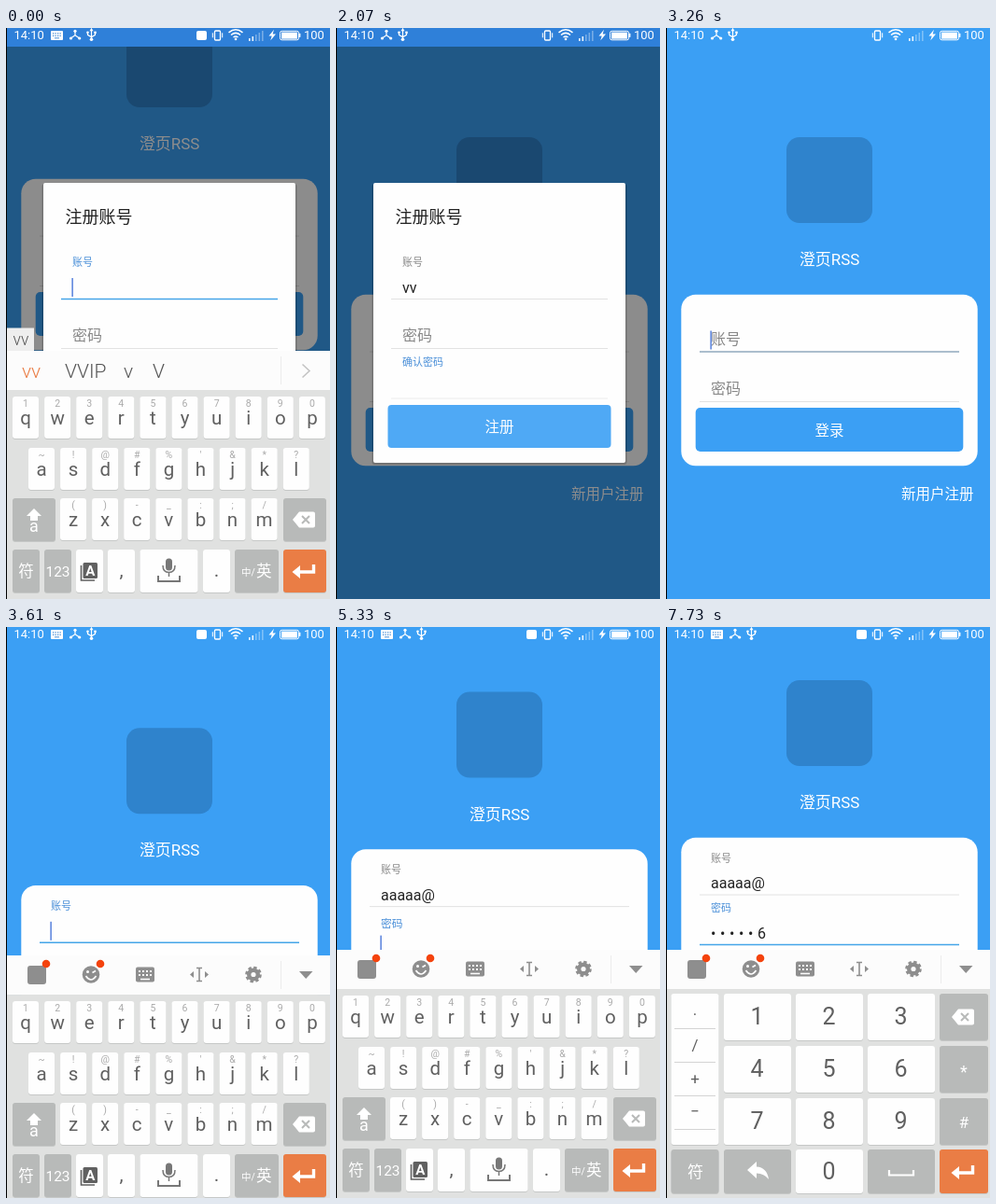
Recreate the animation shown at these times as an HTML page. Size 347 px wide and 612 px high, loop 8000 ms.

```html
<!DOCTYPE html>
<html lang="zh-CN">
<head>
<meta charset="utf-8">
<title>登录与注册</title>
<style>
html, body { margin: 0; width: 100%; height: 100%; overflow: hidden; background: #3b9ff4; }
svg { display: block; width: 100%; height: 100%; }
text { font-family: Roboto, 'Noto Sans CJK SC', 'Noto Sans CJK', sans-serif; white-space: pre; }
</style>
</head>
<body>
<svg id="stage" viewBox="0 0 347 612"></svg>
<script>
const LOOP = 8000;
const BLUE = '#3b9ff4', GREY = '#b8bab9', INK = '#606060', ORANGE = '#ea7d45', ICON = '#8e8e8e';

// Markup helpers
const rect = (x, y, w, h, fill, r = 0, more = '') =>
  `<rect x="${x}" y="${y}" width="${w}" height="${h}" rx="${r}" fill="${fill}" ${more}/>`;
const text = (x, y, s, size, fill, more = '') =>
  `<text x="${x}" y="${y}" font-size="${size}" fill="${fill}" ${more}>${s}</text>`;
const mid = (x, y, s, size, fill, more = '') => text(x, y, s, size, fill, 'text-anchor="middle" ' + more);
const dot = (x, y, r, fill) => `<circle cx="${x}" cy="${y}" r="${r}" fill="${fill}"/>`;
const line = (d, stroke, w = 1, more = '') =>
  `<path d="${d}" fill="none" stroke="${stroke}" stroke-width="${w}" ${more}/>`;
const shape = (d, fill) => `<path d="${d}" fill="${fill}"/>`;
const group = (id, body, more = '') => `<g id="${id}" ${more}>${body}</g>`;
const at = (x, y, body) => `<g transform="translate(${x} ${y})">${body}</g>`;

const key = (x, y, w, h, fill = '#fefefe', id = '') =>
  rect(x, y + 1, w, h, '#c6c8c7', 3) + rect(x, y, w, h, fill, 3, id && `id="${id}"`);
const backspace = (x, y) => at(x, y,
  shape('M-12 0L-5 -8.5H10Q12 -8.5 12 -6.5V6.5Q12 8.5 10 8.5H-5Z', '#fff') + line('M-2 -4L6 4M6 -4L-2 4', GREY, 2));
const enter = (x, y) => at(x, y,
  line('M10.5 -7V1H-6', '#fff', 3.4) + shape('M-12.5 1L-4 -6V8Z', '#fff'));

function letterKeys() {
  const rows = [
    [21, 395, 'qwertyuiop', '1234567890'],
    [38, 450, 'asdfghjkl', "~!@#%'&*?"],
    [72, 504, 'zxcvbnm', '()-_:;/']
  ];
  let out = '';
  for (const [x0, y, letters, marks] of rows) {
    [...letters].forEach((c, i) => {
      const x = x0 + i * 34.1;
      out += key(x - 14, y, 28, 45, '#fefefe', 'key-' + c) +
        mid(x, y + 11, marks[i].replace('&', '&amp;'), 10.5, '#aaa') + mid(x, y + 30, c, 20.5, INK);
    });
  }
  out += key(7, 504, 46, 46, GREY) + shape('M30 515L38 523H34V528H26V523H22Z', '#fff') + mid(30, 539.5, 'a', 18, '#fff') +
    key(297, 504, 46, 46, GREY) + backspace(319, 527);
  const y = 559;
  out += key(7, y, 29, 46, GREY) + mid(21.5, 588, '符', 16.5, '#fff') +
    key(41, y, 29, 46, GREY) + mid(55.5, 588, '123', 15.5, '#fff') +
    key(75, y, 29, 46) + line('M80.500 576V592H95', INK, 1.6) + rect(82.5, 573, 15.5, 17, INK, 1.5) +
    mid(90.2, 587, 'A', 15, '#fff', 'font-weight="700"') +
    key(109, y, 29, 46) + mid(123.5, 588, ',', 21, INK) +
    key(143.5, y, 62, 46) + rect(171, 568.5, 7, 13, '#777', 3.5) + line('M168 576Q168 583.500 174.500 583.500T181 576M174.500 583.500V588', '#777', 1.5) +
    line('M163 587V593H186V587', '#777', 2) +
    key(211, y, 29, 46) + mid(225.5, 588, '.', 21, INK) +
    key(245, y, 47, 46, GREY) + text(252, 587, '中/', 10.5, '#fff') + text(268, 588, '英', 16.5, '#fff') +
    key(297, y, 46, 46, ORANGE) + enter(319, 582);
  return out;
}

function digitKeys() {
  let out = key(5.5, 393, 51, 162);
  ['.', '/', '+', '−'].forEach((c, i) => {
    out += mid(31, [416, 454, 490, 525][i], c, 17, INK) + line(`M9 ${430.5 + i * 36}H53`, '#d4d4d4');
  });
  for (let n = 1; n < 10; n++) {
    const x = 62 + (n - 1) % 3 * 77, y = 393 + Math.floor((n - 1) / 3) * 56;
    out += key(x, y, 72, 50, '#fefefe', 'key-' + n) + mid(x + 35.5, y + 33, n, 25, INK);
  }
  out += [393, 449, 505].map(y => key(293, y, 52, 50, GREY)).join('') + backspace(318, 418) +
    mid(319, 483, '*', 18, '#fff') + mid(319, 537, '#', 17, '#fff');
  out += key(5.5, 560, 51, 47, GREY) + mid(31.5, 590, '符', 17, '#fff') +
    key(62, 560, 72, 47, GREY) +
    shape('M87 582L97 573V578.500Q108 579 110 592Q105 585.500 97 585.500V591Z', '#fff') +
    key(139, 560, 72, 47) + mid(174.5, 592, 0, 25, INK) +
    key(216, 560, 72, 47, GREY) + line('M239 582V587.500H265V582', '#fff', 2.2) +
    key(293, 560, 52, 47, ORANGE) + enter(318, 584);
  return out;
}

const toolbar = () =>
  rect(23, 357, 20, 20, ICON, 3) + dot(43, 355, 4.3, '#f4430d') +
  dot(91, 366.5, 9.3, ICON) + dot(87.5, 363.5, 1.5, '#fff') + line('M92.500 364.500L96 362.500M85.500 368Q91 376 96.500 368', '#fff', 1.6) +
  dot(101, 355, 4.3, '#f4430d') +
  rect(139, 358.5, 20, 16, ICON, 2) + line('M142 363H156M142 367H156', '#fcfcfc', 2, 'stroke-dasharray="2 2"') + line('M144 371.500H154', '#fcfcfc', 1.6) +
  line('M204 359.500H210M204 373.500H210M207 359.500V373.500', ICON, 1.6) + shape('M197 366.500L201 363V370ZM217 366.500L213 363V370Z', ICON) +
  `<circle cx="265" cy="366.500" r="4.800" fill="none" stroke="${ICON}" stroke-width="4.400"/>` +
  `<circle cx="265" cy="366.500" r="7.500" fill="none" stroke="${ICON}" stroke-width="2.600" stroke-dasharray="3.400 2.490"/>` +
  shape('M314 363H328.500L321.200 371Z', ICON);

const candidates = (list, arrow) =>
  list.map(([x, s], i) => text(x, 374.5, s, 21, i ? '#555' : ORANGE, 'font-weight="300"')).join('') +
  line('M317.500 360.500L325 367.500L317.500 374.500', arrow, 1.6);
const composing = (s, w) =>
  rect(1, 321.5, w, 24.5, '#eeeeee') + text(7.5, 340, s, 17.5, '#555', 'font-weight="300"');

function statusBar() {
  const w = '#fff';
  return rect(0, 0, 347, 20, '#2f80d9', 0, 'id="bar"') + at(0, -.7,
    text(8.5, 13, '14:10', 13, w) +
    group('imeIcons',
      rect(48, 3.7, 13, 10, w, 1) + line('M50 6.500H59M50 9H59', '#4a8fd6', 1.2, 'stroke-dasharray="1.300 1.200"') + line('M52 11.500H57', '#4a8fd6') +
      rect(204, 3.7, 11, 10, w, 2)) +
    group('leftIcons',
      line('M54 4V8.500L49 12M54 8.500L59 12', w, 1.2) + dot(54, 4, 1.6, w) + dot(49.5, 11.7, 1.6, w) + dot(58.7, 11.7, 1.6, w) +
      line('M71.500 3V13M67.500 5.500V8L71.500 10.500L75.500 8V5.500', w, 1.2) + shape('M71.500 .5L69.500 4H73.500Z', w) + dot(71.5, 13, 1.8, w) + dot(67.5, 5.5, 1.3, w) + rect(74.3, 4.3, 2.4, 2.4, w)) +
    rect(223.5, 3.7, 6, 10, 'none', 1, 'stroke="#fff" stroke-width="1.300"') + line('M221.300 6V11M231.700 6V11', w) +
    line('M238.500 5.500Q246 -.5 253.500 5.500M241 8.200Q246 4 251 8.200M243.500 10.700Q246 8.800 248.500 10.700', w, 1.5) + dot(246, 12.6, 1.3, w) +
    [0, 1, 2, 3, 4].map(i => rect(260 + i * 3.5, 11.7 - i * 2, 1.6, 3 + i * 2, w, 0, `opacity="${i < 2 ? .9 : .35}"`)).join('') +
    shape('M287 2.500L281.500 9.200H284.700L283.300 14L289 7.200H285.600Z', w) +
    rect(293.5, 4, 20, 9.5, 'none', 2, 'stroke="#fff"') + rect(295, 5.3, 17, 7, w) + rect(314, 6.5, 1.4, 4, w) +
    text(319, 13, '100', 13, w));
}

const stage = document.getElementById('stage');
stage.innerHTML =
  '<defs><clipPath id="btnClip"><rect x="55" y="404" width="240" height="46" rx="4"/></clipPath></defs>' +
  rect(0, 0, 347, 612, BLUE) +
  group('app',
    rect(129, 117, 92, 92, '#2f83cc', 14) + mid(175, 254, '澄页RSS', 17, '#fff') +
    rect(16.3, 285.7, 317.4, 183.6, '#fefefe', 15.5) + group('loginFields', '') +
    rect(31.7, 407, 286.6, 47, BLUE, 5) + mid(175, 436.5, '登录', 15.5, '#fff') +
    text(252, 504.7, '新用户注册', 15.5, '#fff')) +
  rect(0, 0, 347, 612, '#000', 0, 'id="dim"') +
  group('dialog',
    rect(38.5, 167, 273, 301, '#000', 3, 'opacity=".18"') + rect(40, 166, 270, 300, '#fefefe', 2) +
    text(63.5, 208.5, '注册账号', 18, '#222') + group('dialogFields', '') +
    rect(55.5, 404, 239, 46, BLUE, 4) +
    '<circle id="ripple" cx="175" cy="427" fill="#fff" clip-path="url(#btnClip)"/>' + mid(175, 432.5, '注册', 15.5, '#fff')) +
  group('keyboard',
    rect(0, 346, 347, 42, '#fcfcfc') + rect(0, 388, 347, 224, '#e0e1e0') + line('M294.500 352V382', '#ececec') +
    group('letters', letterKeys()) + group('digits', digitKeys()) + group('tools', toolbar()) +
    group('candV', composing('vv', 29) + candidates([[17, 'vv'], [63, 'VVIP'], [126, 'v'], [157, 'V']], '#c4c4c4')) +
    group('candA', composing('a', 22) + candidates([[17, 'a'], [54, 'aaaaa@'], [150, 'are'], [198, 'and'], [252, 'AA']], '#888'))) +
  statusBar() + rect(0, 0, 1, 612, '#000');

const $ = id => document.getElementById(id);
const set = (el, attrs) => { for (const k in attrs) el.setAttribute(k, attrs[k]); };
const show = (id, on) => $(id).setAttribute('display', on ? 'inline' : 'none');
const move = (id, x, y) => $(id).setAttribute('transform', `translate(${x} ${y})`);
const ramp = (t, a, b) => Math.min(1, Math.max(0, (t - a) / (b - a)));
const ease = (t, a, b) => 1 - (1 - ramp(t, a, b)) ** 2;

// Text field with a floating label; base is the y of its underline
function makeField(parent, x, right, base, name) {
  const g = document.createElementNS(stage.namespaceURI, 'g');
  g.innerHTML = line(`M${x - 12} ${base}H${right}`, '#ddd') + text(x, 0, name, 16, '#888') +
    text(x, base - 7, '', 16, '#222') + rect(x - .7, base - 22.5, 1.7, 20, '#6a8fe0');
  $(parent).append(g);
  const [rule, label, value, caret] = g.children;
  return ({ lift = 0, focus = false, val = '', caretX = 0, blink = false, rule: tint }) => {
    set(rule, { stroke: tint || (focus ? (lift ? '#45a5e8' : '#8fa9bd') : '#e2e2e2'), 'stroke-width': focus && !tint ? 1.4 : 1 });
    set(label, { y: base - 8.5 - 27 * lift, 'font-size': 16 - 5 * lift, fill: focus && lift ? '#4a8fd8' : '#888' });
    if (value.innerHTML !== val) value.innerHTML = val;
    set(caret, { x: x - .7 + caretX, display: focus && blink ? 'inline' : 'none' });
  };
}
const account = makeField('loginFields', 48, 314, 347, '账号');
const password = makeField('loginFields', 48, 314, 400.5, '密码');
const newAccount = makeField('dialogFields', 71, 291, 290.5, '账号');
const newPassword = makeField('dialogFields', 71, 291, 343.5, '密码');
const confirmation = makeField('dialogFields', 71, 291, 397, '确认密码');

const presses = [6136, 6370, 6550, 6780, 7010, 7172];
const inputs = presses.map(p => p + 56);
const resets = [0, 180, 330, 550, 3255, 4610, 5210, ...inputs];

function masked(n) {
  return n ? `<tspan letter-spacing="4.600">${'•'.repeat(n - 1)}</tspan>${n}` : '';
}

function draw(t) {
  const last = resets.filter(r => r <= t).pop() || 0;
  const blink = (t - last) % 1000 < 500;
  const inDialog = t < 2550;

  const shift = inDialog ? -124 * (1 - ease(t, 740, 970)) : -8.7 * ease(t, 3320, 3560) - 51.3 * ease(t, 5210, 5450);
  move('app', 0, shift);
  $('dim').setAttribute('opacity', .45 * (1 - ramp(t, 2575, 2780)));
  show('dialog', inDialog);
  show('bar', inDialog);

  newAccount({ lift: 1, focus: t < 330, val: t < 180 ? '' : 'vv', caretX: t < 180 ? 0 : 16, blink });
  newPassword({ lift: ease(t, 330, 500) - ease(t, 550, 720), focus: t >= 330 && t < 550, blink });
  confirmation({ lift: ease(t, 550, 720), focus: t >= 550, blink, rule: t > 900 ? '#ececec' : '' });
  set($('ripple'), { r: 20 + 110 * ease(t, 1550, 2000), opacity: t < 1550 ? 0 : .2 * (1 - ramp(t, 1850, 2310)) });

  const typed = t >= 4610;
  account({
    lift: ease(t, 3310, 3510), focus: t >= 3255 && t < 5210,
    val: typed ? 'aaaaa@' : '', caretX: typed ? 58 : 0, blink
  });
  const n = inputs.filter(p => p <= t).length;
  password({ lift: ease(t, 5210, 5410), focus: t >= 5210, val: masked(n), caretX: n * 10, blink });

  const down = inDialog ? ramp(t, 700, 970) ** 1.6 : 1 - ease(t, 3320, 3660);
  move('keyboard', 0, 290 * down);
  const numeric = t >= 5670, candV = t < 180, candA = t >= 4080 && t < 4610;
  show('letters', !numeric);
  show('digits', numeric);
  show('candV', candV);
  show('candA', candA);
  show('tools', !candV && !candA);
  const tint = (id, on) => $('key-' + id).setAttribute('fill', on ? '#e4e4e4' : '#fefefe');
  tint('a', t >= 4020 && t < 4140);
  presses.forEach((p, i) => tint(i + 1, t >= p && t < p + 64));

  const ime = t < 1020 || t >= 3500;
  show('imeIcons', ime);
  move('leftIcons', ime ? 20 : 0, 0);
}

const start = performance.now();
function tick() {
  draw((performance.now() - start) % LOOP);
  requestAnimationFrame(tick);
}
tick();
</script>
</body>
</html>
```
